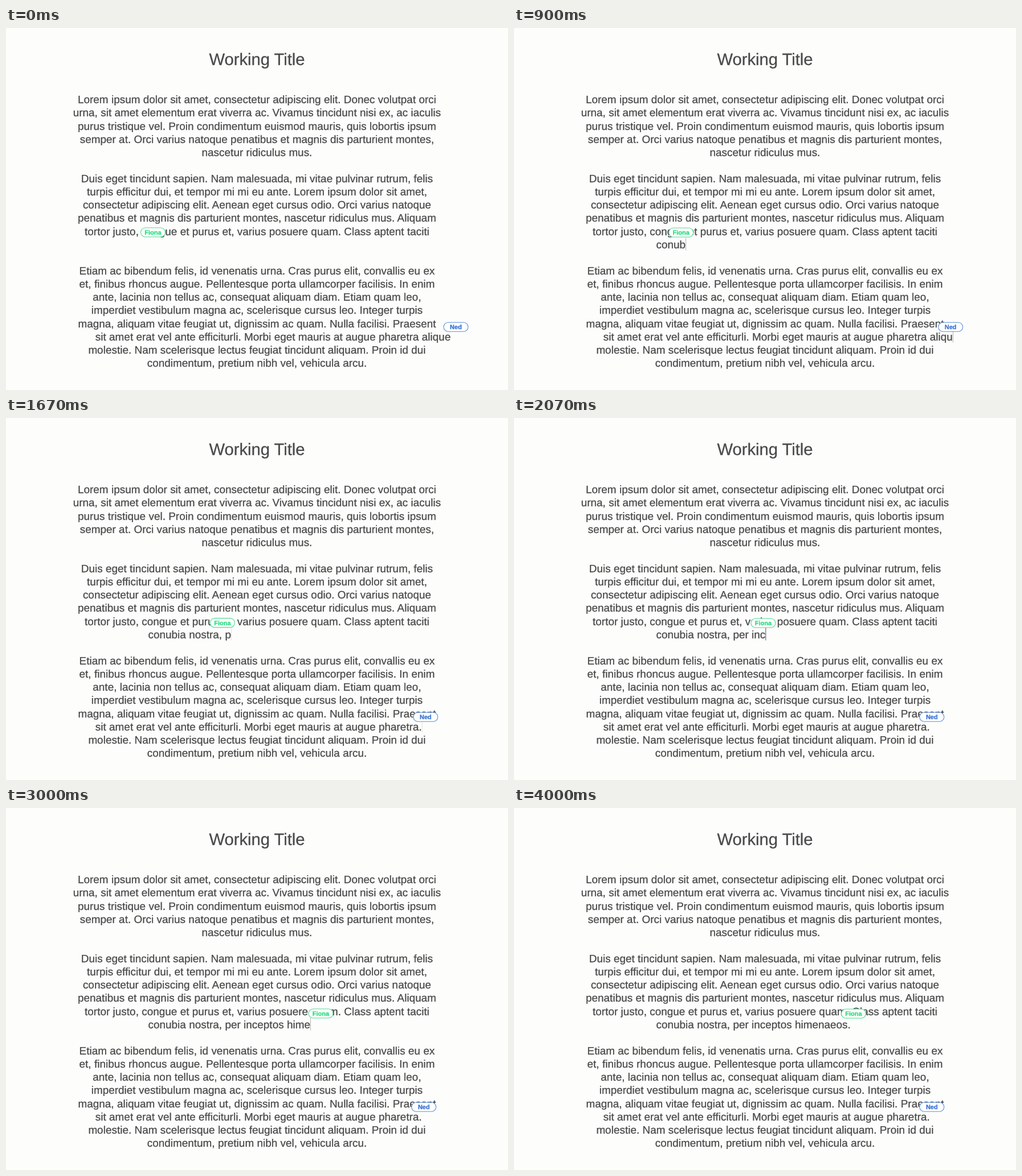
Recreate the animation shown at these times as an HTML page. Size 881 by 636 pixels, loop 4030 ms.

```html
<!DOCTYPE html>
<html lang="la">
<head>
<meta charset="utf-8">
<title>Shared document</title>
<style>
  html, body { margin: 0; width: 100%; height: 100%; overflow: hidden; background: #fdfdfc; }
  svg { display: block; font-family: "Liberation Sans", Arial, sans-serif; text-rendering: geometricPrecision; }
  text { color: #4a4a4a; fill: currentColor; stroke: currentColor; stroke-width: 0.3px; white-space: pre; }
  .body { font-size: 18.85px; letter-spacing: 0.05px; }
  .title { font-size: 29.2px; }
  .tag { font-size: 11px; font-weight: bold; }
</style>
</head>
<body>
<svg id="stage" width="881" height="636" viewBox="0 0 881 636"></svg>
<script>
const LOOP = 4030, CENTER = 440.5, FIRST_BASELINE = 132.3, LINE = 23.13;
const stage = document.getElementById("stage");

// An empty entry is a blank or live-edited row.
const rows = [
  "Lorem ipsum dolor sit amet, consectetur adipiscing elit. Donec volutpat orci",
  "urna, sit amet elementum erat viverra ac. Vivamus tincidunt nisi ex, ac iaculis",
  "purus tristique vel. Proin condimentum euismod mauris, quis lobortis ipsum",
  "semper at. Orci varius natoque penatibus et magnis dis parturient montes,",
  "nascetur ridiculus mus.",
  "",
  "Duis eget tincidunt sapien. Nam malesuada, mi vitae pulvinar rutrum, felis",
  "turpis efficitur dui, et tempor mi mi eu ante. Lorem ipsum dolor sit amet,",
  "consectetur adipiscing elit. Aenean eget cursus odio. Orci varius natoque",
  "penatibus et magnis dis parturient montes, nascetur ridiculus mus. Aliquam",
  "tortor justo, congue et purus et, varius posuere quam. Class aptent taciti",
  "",
  "",
  "Etiam ac bibendum felis, id venenatis urna. Cras purus elit, convallis eu ex",
  "et, finibus rhoncus augue. Pellentesque porta ullamcorper facilisis. In enim",
  "ante, lacinia non tellus ac, consequat aliquam diam. Etiam quam leo,",
  "imperdiet vestibulum magna ac, scelerisque cursus leo. Integer turpis",
  "magna, aliquam vitae feugiat ut, dignissim ac quam. Nulla facilisi. Praesent",
  "",
  "molestie. Nam scelerisque lectus feugiat tincidunt aliquam. Proin id dui",
  "condimentum, pretium nibh vel, vehicula arcu."
];

const ADDED = "conubia nostra, per inceptos himenaeos.";
const KEPT = "sit amet erat vel ante efficiturli. Morbi eget mauris at augue pharetra";
const REMOVED = " alique";

function add(parent, name, attrs, content = "") {
  const node = document.createElementNS("http://www.w3.org/2000/svg", name);
  for (const key in attrs) node.setAttribute(key, attrs[key]);
  node.textContent = content;
  return parent.appendChild(node);
}

const baseline = row => FIRST_BASELINE + row * LINE;

function liveRow(row, x) {
  const y = baseline(row);
  const text = add(stage, "text", { class: "body", x, y });
  const caret = add(stage, "rect", { y: y - 18, width: 1, height: 22, fill: "#4a4a4a" });
  return (value, opacity) => {
    text.textContent = value;
    caret.setAttribute("x", x + (value ? text.getComputedTextLength() : -0.5));
    caret.setAttribute("opacity", opacity);
  };
}

function makeTag(name, color, ink) {
  const group = add(stage, "g", {});
  add(group, "rect", { x: -21.5, y: -8, width: 43, height: 16, rx: 8, fill: "#fff", stroke: color, "stroke-width": 1.1 });
  const label = add(group, "text", { class: "tag", y: 4, "text-anchor": "middle" }, name);
  label.style.color = ink;
  return (x, y) => group.setAttribute("transform", `translate(${x} ${y})`);
}

const clamp = v => Math.min(1, Math.max(0, v));
const mix = (a, b, p) => a + (b - a) * p;

// Cubic Bezier easing, solved for x by bisection.
function bezier(x1, y1, x2, y2) {
  const at = (a, b, s) => 3 * a * (1 - s) * (1 - s) * s + 3 * b * (1 - s) * s * s + s * s * s;
  return x => {
    let low = 0, high = 1;
    for (let i = 0; i < 24; i++) {
      const mid = (low + high) / 2;
      if (at(x1, x2, mid) < x) low = mid; else high = mid;
    }
    return at(y1, y2, low);
  };
}
const easeInOut = bezier(0.42, 0, 0.58, 1);
const ease = bezier(0.25, 0.1, 0.25, 1);

function countAt(t, points) {
  for (let i = 1; i < points.length; i++) {
    const [t0, n0] = points[i - 1], [t1, n1] = points[i];
    if (t < t1) return Math.floor(mix(n0, n1, clamp((t - t0) / (t1 - t0))));
  }
  return points[points.length - 1][1];
}

const typing = [[500, 0], [1270, 11.5], [2070, 23.5], [2570, 28.5], [3370, 38.5], [3470, 39]];
const erasing = [[750, 0], [1270, 5.5], [1450, 7]];

function blink(t, end) {
  if (t < 430 || t > end) return 0;
  const phase = (t - 430) % 700 / 350;
  return phase < 1 ? ease(phase) : 1 - ease(phase - 1);
}

add(stage, "text", { class: "title", x: CENTER, y: 65, "text-anchor": "middle" }, "Working Title");
rows.forEach((line, i) => {
  if (line) add(stage, "text", { class: "body", x: CENTER, y: baseline(i), "text-anchor": "middle" }, line);
});
const writeAdded = liveRow(11, 249.5);
const writeErased = liveRow(18, 156.8);
const moveGreen = makeTag("Fiona", "#52d898", "#2bdc7e");
const moveBlue = makeTag("Ned", "#5b8fe0", "#3b74d6");

function draw(t) {
  writeAdded(ADDED.slice(0, countAt(t, typing)), blink(t, 3600));
  const left = REMOVED.length - countAt(t, erasing);
  const tail = t < 1600 ? REMOVED.slice(0, left) : ".";
  writeErased(KEPT + tail, blink(t, 1750));

  const green = easeInOut(clamp(t / 4000));
  moveGreen(mix(258, 596, green), mix(359, 361.3, green));
  moveBlue(mix(789.5, 733.3, easeInOut(clamp(t / 2000))), 525.2);
}

const start = performance.now();
function tick() {
  draw((performance.now() - start) % LOOP);
  requestAnimationFrame(tick);
}
tick();
</script>
</body>
</html>
```
